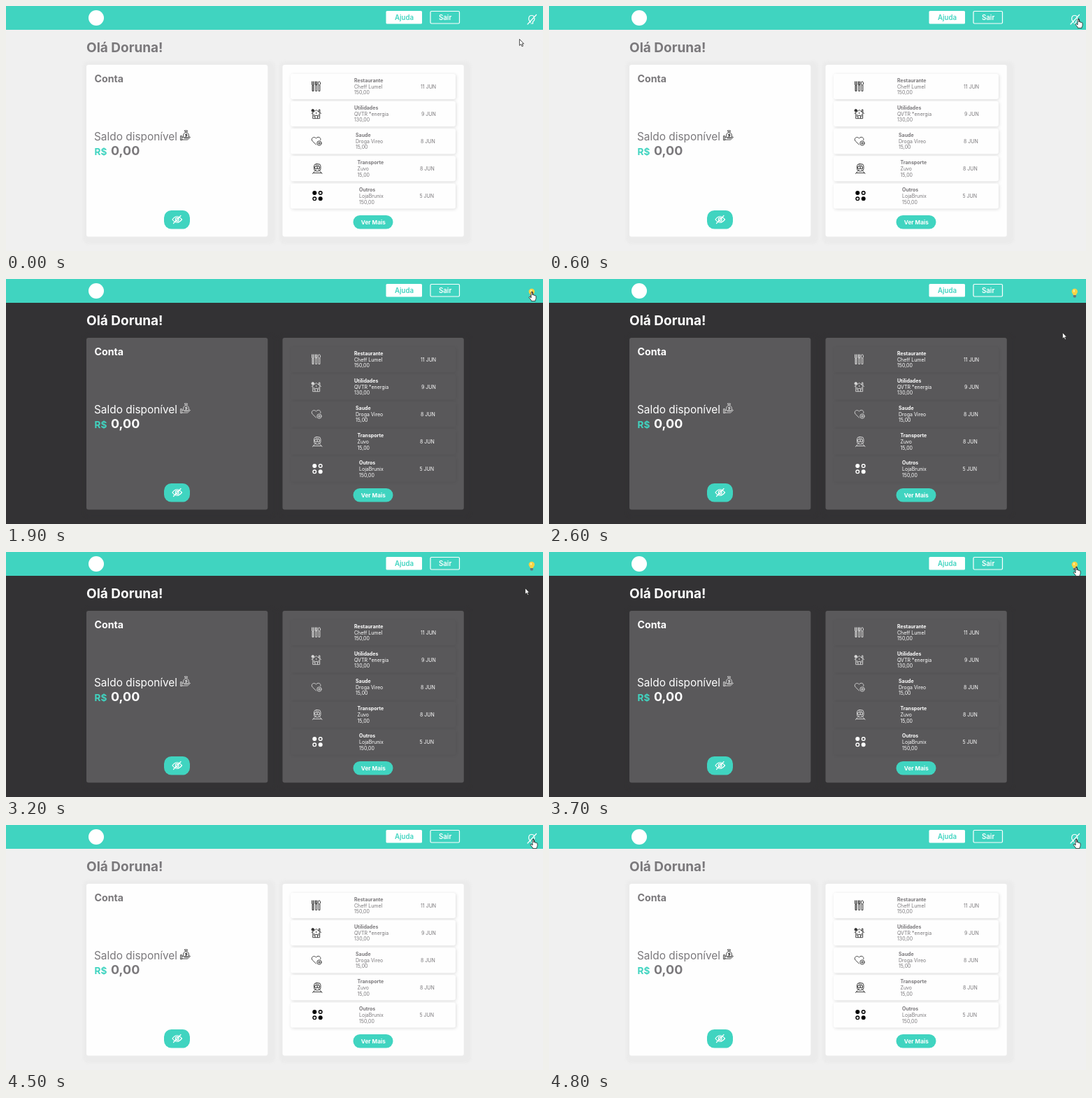
An HTML page that plays this animation: 768x350 px, repeating every 4900 ms.

```html
<!DOCTYPE html>
<html lang="pt">
<head>
<meta charset="utf-8">
<title>Conta</title>
<style>
  html, body { margin: 0; width: 100%; height: 100%; overflow: hidden; }
  svg {
    display: block; width: 768px; height: 350px;
    font-family: Inter, "Open Sans", sans-serif;
    --teal: #40d4c0; --bg: #f0f0f0; --halo: #ebebeb; --card: #fefefe; --row: #fefefe;
    --text: #7a787b; --ink: #333; --dot: #000; --shade: rgba(0, 0, 0, .13);
    background: var(--bg);
  }
  svg.dark {
    --bg: #333234; --halo: #333234; --card: #5a595b; --row: #59585a;
    --text: #fff; --ink: #d8d8d8; --dot: #fff; --shade: rgba(0, 0, 0, .06);
  }
  text { fill: var(--text); white-space: pre; }
  .b { font-weight: 700; }
  .s { font-weight: 600; }
  .teal { fill: var(--teal); }
  .white { fill: #fff; }
  .halo { fill: var(--halo); filter: blur(1.5px); }
  .card { fill: var(--card); }
  .row { fill: var(--row); filter: drop-shadow(1.5px 1.5px 2px var(--shade)); }
  .icon { fill: none; stroke: var(--ink); stroke-width: .9; stroke-linecap: round; stroke-linejoin: round; }
  .line { fill: none; stroke: #fff; stroke-width: 1.2; stroke-linecap: round; }
  .dots { stroke: var(--dot); stroke-width: 1.4; fill: none; }
  .dots .full { fill: var(--dot); }
  .cursor { fill: #fff; stroke: #222; stroke-width: .8; stroke-linejoin: round; }
  .dark .off, svg:not(.dark) .on { display: none; }
</style>
</head>
<body>
<svg id="stage" viewBox="0 0 768 350">
  <rect class="teal" width="768" height="34"/>
  <circle class="white" cx="129" cy="17" r="11"/>
  <rect class="white" x="543.5" y="7" width="51.5" height="18.5" rx="1.5"/>
  <text class="s teal" x="556" y="19.6" font-size="9.7">Ajuda</text>
  <rect class="line" x="607" y="7.5" width="41.5" height="17.5" rx="1.5"/>
  <text class="s white" x="619" y="19.6" font-size="9.7">Sair</text>

  <g class="off line">
    <path d="M750 23.5v-1.2C746.3 20 747 13.5 751.7 13.5S757.2 20 753.5 22.3V25H751M746 26 758.5 12.5"/>
  </g>
  <g class="on">
    <path fill="#fbd343" d="M749.7 23C749.7 21 747.6 20.5 747.6 18A4.2 4.2 0 0 1 756 18C756 20.5 753.9 21 753.9 23Z"/>
    <path fill="#fff3b0" d="M750 15.5h1.7v3H750z"/>
    <path fill="#66787d" d="M749.8 23h4v2.2l-1 1.2h-2l-1-1.2z"/>
  </g>

  <text class="b" x="115" y="65.8" font-size="19">Olá Doruna!</text>

  <rect class="halo" x="110" y="79" width="275" height="261" rx="8"/>
  <rect class="halo" x="391" y="79" width="274" height="261" rx="8"/>
  <rect class="card" x="115" y="84" width="259.3" height="245.5" rx="3"/>
  <rect class="card" x="395.5" y="84" width="259.3" height="245.5" rx="3"/>

  <text class="b" x="126.5" y="108.6" font-size="14.2">Conta</text>
  <text x="126" y="192" font-size="15.4">Saldo disponível</text>
  <text class="b teal" x="126.5" y="213.2" font-size="13.6">R$</text>
  <text class="b" x="150" y="213.2" font-size="18">0,00</text>
  <g class="icon">
    <path d="M255.5 178h4l-1 2.2q3.8 2.6 3 6.2-.5 2-4 2t-4-2q-.8-3.6 3-6.2zM256.5 180.3h2.2"/>
    <path d="M258.9 183.2q-2.6-.6-2.5.7t2.3 1-1.9 1.5M257.6 182.5v5"/>
    <path d="M249.5 186v5.5h2V186zM251.5 187.5q2-1.3 3.8 1.2h3M251.5 191h8l4-3.5q-.8-1.2-2.2 0l-2.2 1.6"/>
  </g>

  <rect class="teal" x="226" y="292" width="37" height="26.5" rx="10.5"/>
  <path class="line" d="M238 305Q244.5 296.5 251.500 305Q244.5 313.500 238 305ZM239.500 310.500 250 299.500"/>
  <circle class="line" cx="244.7" cy="305" r="2.4"/>

  <g id="rows"></g>

  <g class="icon">
    <path d="M437.500 108v4q0 1.500 1.500 1.500t1.500-1.500v-4M439 108v13.500M438 114v7.500h2V114"/>
    <path d="M442.500 108v4.500h2.500V108M443.700 108v5M442.700 113v8.500h2V113"/>
    <ellipse cx="448" cy="110.500" rx="1.600" ry="2.700"/>
    <path d="M447 113.500v8h2v-8"/>
  </g>
  <g class="icon">
    <path d="M437 153.500 443.700 148.500 450.500 153.500M438.700 153v7.700h10V153M447.500 151v-3h1.500v4"/>
    <circle cx="438.800" cy="149.300" r="1.800" fill="var(--ink)"/>
    <path d="M442 160.500v-4h3.500v4M440.500 155v3M447 155v3M443.700 152v2"/>
  </g>
  <g class="icon">
    <path d="M443.500 198 438.500 193.300C435 189.500 440 185.300 443.500 189 447 185.300 451 188.500 449.800 191.500"/>
    <circle cx="448" cy="196" r="3.200"/>
    <path d="M446.500 196h3M448 194.500v3"/>
  </g>
  <g class="icon">
    <rect x="440.500" y="225.500" width="9.500" height="10.500" rx="3.500"/>
    <path d="M442 229.500h6.500v3H442zM445.200 229.500v3M443 227.500h4.500M442.500 234.300h1M447 234.300h1M441 236.500 438.500 239.500M449.500 236.500 452 239.500M439.500 238.500h11.500"/>
  </g>
  <g class="dots">
    <circle class="full" cx="441.300" cy="267" r="2.300"/>
    <circle cx="449.700" cy="267" r="2.300"/>
    <circle cx="441.300" cy="275.300" r="2.300"/>
    <circle class="full" cx="449.700" cy="275.300" r="2.300"/>
  </g>

  <rect class="teal" x="496.500" y="299" width="57" height="19.500" rx="9.700"/>
  <text class="b white" x="507.800" y="311.800" font-size="8.200">Ver Mais</text>

  <g id="cursor" class="cursor">
    <path id="arrow" d="M.4.4V9.400L2.500 7.500 4 10.800 5.500 10.100 4 7H6.600Z"/>
    <path id="hand" d="M-1 1Q0-.8 1 1V5Q2-.0 0 0 2.200 4 2.900 5.400 4.300 4.400 4.700 5.800 6 5.200 6 6.800V9.500Q6 11 5 12V13.500H-.8V12.300L-3.800 8.800Q-4.200 7-2.600 7.500L-1 9Z"/>
  </g>
</svg>
<script>
const LOOP = 4900, DARK_AT = 1900, LIGHT_AT = 4500;
const $ = id => document.getElementById(id);

// category, payee, amount, date, text x, date x
const entries = [
  ["Restaurante", "Cheff Lumel", "150,00", "11 JUN", 498, 593],
  ["Utilidades", "QVTR *energia", "130,00", "9 JUN", 498, 594],
  ["Saude", "Droga Vireo", "15,00", "8 JUN", 500, 593],
  ["Transporte", "Zuvo", "15,00", "8 JUN", 502.5, 592],
  ["Outros", "LojaBrunix", "150,00", "5 JUN", 505, 591.5],
];
const label = (x, y, s, cls = "") => `<text class="${cls}" x="${x}" y="${y}" font-size="7">${s}</text>`;
$("rows").innerHTML = entries.map(([kind, payee, sum, date, x, dateX], i) => {
  const y = 97 + 39.1 * i;
  return `<rect class="row" x="407" y="${y}" width="236" height="36" rx="3"/>`
    + label(x, y + 12, kind, "b") + label(x, y + 20.6, payee)
    + label(x, y + 29.2, sum) + label(dateX, y + 20.6, date);
}).join("");

// time, x, y: the pointer jumps at each step
const steps = [
  [0, 734, 47], [100, 738, 41], [200, 744, 31], [300, 753, 21], [400, 760, 17],
  [600, 757, 18], [700, 750, 18], [800, 739, 18], [900, 741, 18], [1000, 747, 18], [1100, 752, 18],
  [2200, 752, 23], [2300, 750, 34], [2400, 745, 48], [2500, 739, 64], [2600, 734, 76], [2700, 732, 82],
  [2800, 731, 82], [3000, 733, 77], [3100, 737, 66], [3200, 742, 51], [3300, 747, 39], [3400, 750, 31],
  [3500, 751, 28], [3600, 755, 23], [3700, 754, 21], [3800, 754, 20],
];

function draw() {
  const t = performance.now() % LOOP;
  const [, x, y] = steps.findLast(s => s[0] <= t);
  const over = x > 744 && x < 760 && y > 11 && y < 27;
  $("stage").classList.toggle("dark", t >= DARK_AT && t < LIGHT_AT);
  $("cursor").setAttribute("transform", `translate(${x} ${y})`);
  $("hand").style.display = over ? "" : "none";
  $("arrow").style.display = over ? "none" : "";
  requestAnimationFrame(draw);
}
draw();
</script>
</body>
</html>
```
